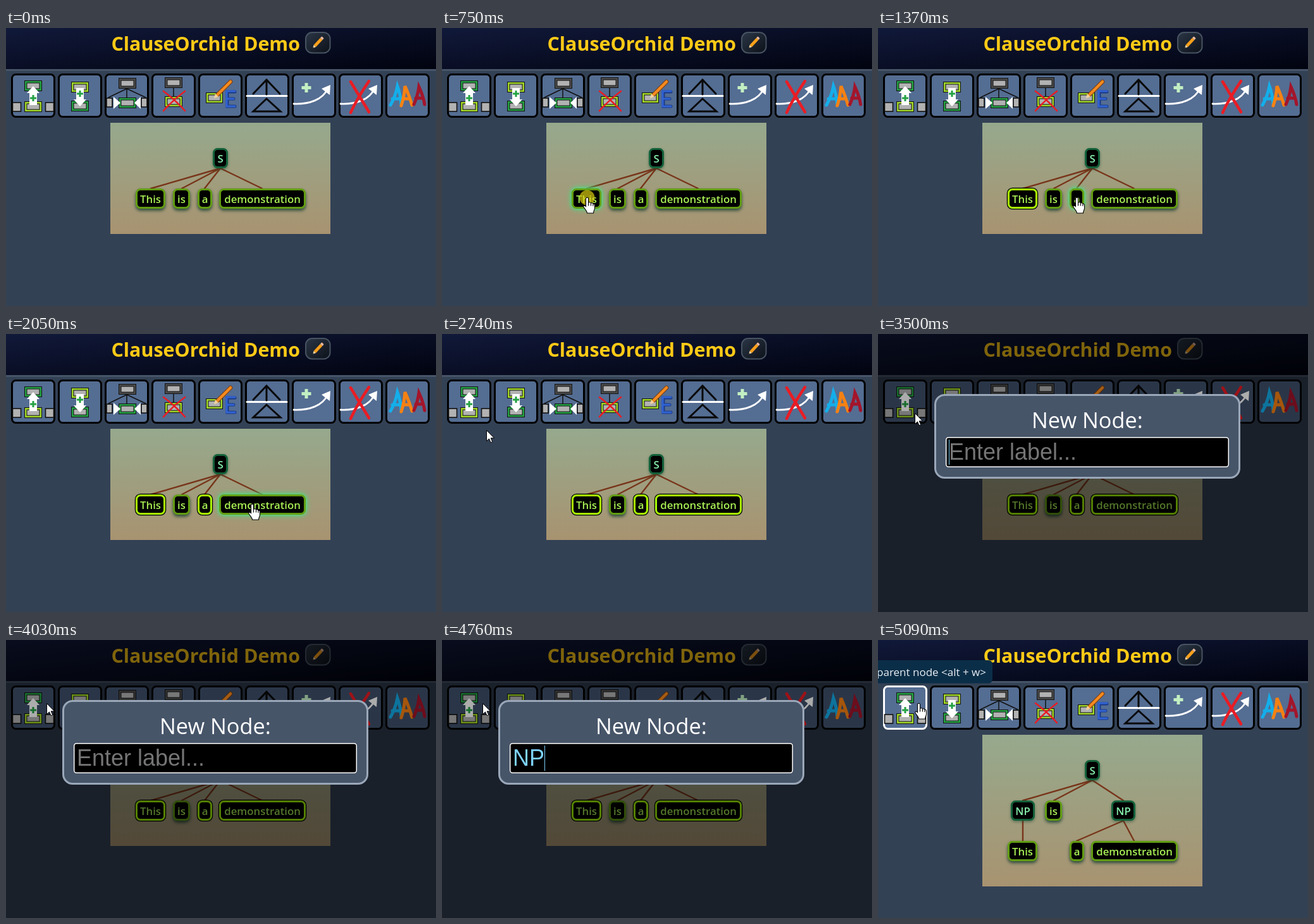
Animation, 680 px wide and 440 px high, one loop 7220 ms. Source, as an HTML page:

```html
<!DOCTYPE html>
<html lang="en">
<head>
<meta charset="utf-8">
<title>ClauseOrchid Demo</title>
<style>
  html, body { margin: 0; width: 100%; height: 100%; overflow: hidden; background: #334155; }
  svg { display: block; width: 680px; height: 440px; }
  text { font-family: "Open Sans", "Noto Sans", sans-serif; }
  .title { font-size: 30.4px; font-weight: 700; fill: #ffca16; }
  .btn { fill: #546d92; stroke: #000; stroke-width: 3; }
  .btn.hover { stroke: #fff; }
  .branch { stroke: #78351a; stroke-width: 2.4; stroke-linecap: round; }
  .node { filter: drop-shadow(0 2px 2px rgba(10, 60, 40, .45)); }
  .node text { font-size: 16.8px; font-weight: 600; text-anchor: middle; fill: #86efac; }
  .node .edge { fill: #000; stroke: #14613a; stroke-width: 3; }
  .node .rim { fill: none; stroke: #000; stroke-width: 5.4; visibility: hidden; }
  .leaf { filter: drop-shadow(0 3px 2.5px rgba(4, 50, 40, .75)); }
  .leaf text { fill: #a9f055; }
  .leaf .edge { stroke: #629d12; }
  .picked { filter: none; }
  .picked .edge { stroke: #aaff00; }
  .picked .rim { visibility: visible; }
  .glow { filter: drop-shadow(0 0 2px #4ade80) drop-shadow(0 0 4px #4ade80); }
  .tip { font-size: 17px; fill: #e8eef4; text-anchor: end; }
  .ask { font-size: 34.3px; fill: #fff; text-anchor: middle; }
  .entry { font: 36px "Liberation Sans", Arial, sans-serif; }
</style>
</head>
<body>
<svg id="stage" viewBox="0 0 680 440" xmlns="http://www.w3.org/2000/svg">
  <defs>
    <linearGradient id="night" x1="0" y1="0" x2="1" y2="1">
      <stop offset="0" stop-color="#11193a"/><stop offset="1" stop-color="#01030f"/>
    </linearGradient>
    <linearGradient id="field" x1="0" y1="0" x2="0" y2="1">
      <stop offset="0" stop-color="#96a98d"/><stop offset="1" stop-color="#a89370"/>
    </linearGradient>
    <linearGradient id="steel" x1="0" y1="0" x2="1" y2="1">
      <stop offset="0" stop-color="#2b3646"/><stop offset="1" stop-color="#0c1119"/>
    </linearGradient>
  </defs>
  <rect width="680" height="440" fill="#334155"/>
  <rect width="680" height="66" fill="url(#night)"/>
  <rect y="65" width="680" height="3" fill="#475569"/>
  <text class="title" x="465" y="36" text-anchor="end">ClauseOrchid Demo</text>
  <rect x="474" y="7" width="38.5" height="32.5" rx="10" fill="url(#steel)" stroke="#475361" stroke-width="2"/>
  <g transform="translate(485 32) rotate(-47)">
    <path d="M0 0L5 -2.4V2.4Z" fill="#f3d9a5"/>
    <path d="M0 0L2 -1V1Z" fill="#222"/>
    <rect x="5" y="-2.4" width="15" height="4.8" fill="#f9a01b"/>
    <rect x="20" y="-2.4" width="3.5" height="4.8" rx="1" fill="#e8b9a0"/>
  </g>
  <g id="buttons"></g>
  <g id="icons"></g>
  <rect id="panel" x="165" y="150" width="348" height="176" fill="url(#field)"/>
  <g id="flat"></g>
  <g id="grown"></g>
  <g id="tooltip">
    <rect x="-40" y="32" width="221" height="36.5" rx="6" fill="#0b2e48"/>
    <text class="tip" x="171" y="56.5">Add parent node &lt;alt + w&gt;</text>
  </g>
  <g id="dialog">
    <rect width="680" height="440" fill="#000" opacity=".5"/>
    <use href="#icons" opacity=".35"/>
    <rect x="90.5" y="96.5" width="481" height="131" rx="15" fill="#475569" stroke="#9aa7b9" stroke-width="3"/>
    <text class="ask" x="331" y="149">New Node:</text>
    <rect x="107.7" y="163.7" width="446.6" height="46.6" rx="4" fill="#000" stroke="#fff" stroke-width="1.5"/>
    <text class="entry" id="entry" x="112" y="199"></text>
    <rect id="caret" y="167" width="1" height="40" fill="#7dd3fc"/>
  </g>
  <circle id="press" r="12" fill="#d8cc10" opacity=".7"/>
  <path id="arrow" d="M0 0V17L4 13.3L6.6 19.2L9.2 18L6.7 12.3H12Z" fill="#fff" stroke="#000"/>
  <path id="hand" d="M-2 1.5C-2 -.8 2 -.8 2 1.5V8C3 6.8 5.5 7 6 8.7C7.3 7.7 9 8.3 9.4 10C11 9.2 12 10.3 12 12V17C12 19 10 21 10 24.5H0C0 21.5 -3 19 -5.5 14.8C-6.5 12.8 -4 11.6 -2 14Z M2 8V13M6 9V13M9.4 10V13.5" fill="#fff" stroke="#000" stroke-width="1.1"/>
</svg>
<script>
const LOOP = 7220, STEP = 70;
const $ = id => document.getElementById(id);

function add(parent, tag, attrs, text) {
  const el = document.createElementNS('http://www.w3.org/2000/svg', tag);
  for (const k in attrs) el.setAttribute(k, attrs[k]);
  if (text) el.textContent = text;
  parent.appendChild(el);
  return el;
}

// Toolbar
const buttons = Array.from({ length: 9 }, (_, i) =>
  add($('buttons'), 'rect', { class: 'btn', x: 9.5 + 74 * i, y: 73.5, width: 67, height: 67, rx: 6 }));

const icons = $('icons');
const fill = (d, color) => add(icons, 'path', { d, fill: color });
const line = (d, color, width) =>
  add(icons, 'path', { d, fill: 'none', stroke: color, 'stroke-width': width, 'stroke-linecap': 'round' });
const plus = (x, y, r, color, width) =>
  add(icons, 'path', { d: `M${x - r} ${y}h${2 * r}M${x} ${y - r}v${2 * r}`, stroke: color, 'stroke-width': width });

function box(x, y, color, w = 28, h = 17) {
  const rect = (m, c, edge) => add(icons, 'rect', {
    x: x + m, y: y + m, width: w - 2 * m, height: h - 2 * m, fill: c, stroke: edge
  });
  rect(.5, color, '#111');
  rect(4, '#b2b2b2', '#111');
}
const sideBox = (x, y, w) =>
  add(icons, 'rect', { x, y, width: w, height: 14, fill: '#b2b2b2', stroke: '#111', 'stroke-width': 1.6 });
const GREEN = '#25a244', LIME = '#a2d729', GREY = '#4b4b4b', RED = '#ea1c24';

box(29, 83, GREEN);
box(29, 116, LIME);
sideBox(10.5, 118, 13);
sideBox(62.5, 118, 13);
fill('M43 92L53 103H49V122H37V103H33Z', '#fff');
plus(43, 111, 5, GREEN, 3);

box(103, 85, LIME);
box(103, 115, GREEN);
fill('M117 124L127 113H123V95H111V113H107Z', '#fff');
plus(117, 104, 5, GREEN, 3);

line('M191 96L162 110M191 96V110M191 96L221 110', '#111', 1.5);
box(178, 79, GREY);
box(178, 110, GREEN);
sideBox(159, 111, 9);
sideBox(214, 111, 9);
fill('M170 109V128L181 118.5ZM213 109V128L203 118.5Z', '#fff');

line('M265 95V108', '#111', 1.5);
box(251, 78, GREY);
box(251, 108, LIME);
line('M249 100Q268 114 283 131M283 100Q264 114 249 131', RED, 2.6);

box(316, 102, LIME, 27);
line('M334 106L355 85', '#7a3d10', 6.5);
line('M334 106L355 85', '#f58a1f', 4.5);
fill('M329 111L331 104L336 109Z', '#f2d3a0');
line('M362 101H350V124H362M350 112H360', '#1b3a86', 5);
line('M362 100H349V124H362M349 112H360', '#3163d4', 3.2);

line('M381 107.5H444', '#fff', 3);
line('M391 104L412 82L433 104M412 82V105M412 112L391 132H434Z', '#0a0a0a', 3);

function swoop(x) {
  line(`M${x} 120C${x + 25} 121 ${x + 46} 113 ${x + 53} 97`, '#fff', 2.8);
  fill(`M${x + 58} 90L${x + 57} 106L${x + 44} 96Z`, '#fff');
}
swoop(455);
plus(475, 94.5, 7.5, '#c2efc2', 5);
swoop(529);
line('M545 85Q560 110 574 133M574 84Q555 112 545 134', RED, 4.5);

line('M608 122Q616 108 619 92Q624 106 625 121M611 112H623', '#14aeea', 5);
line('M625 123Q630 108 631 92Q638 108 642 122M628 112H638', '#f58113', 5);
line('M645 121Q651 108 653 93Q660 108 662 121M648 111H659', '#a3152b', 5);

// Trees
function branches(parent, x, y, ends) {
  for (const end of ends) add(parent, 'line', { class: 'branch', x1: x, y1: y, x2: end, y2: y + 32 });
}
function node(parent, label, x1, x2, y, kind = '') {
  const g = add(parent, 'g', { class: 'node ' + kind });
  const shape = { x: x1 + 1.5, y: y + 1.5, width: x2 - x1 - 3, height: 29, rx: 6 };
  add(g, 'rect', { ...shape, class: 'rim' });
  add(g, 'rect', { ...shape, class: 'edge' });
  add(g, 'text', { x: (x1 + x2) / 2, y: y + 22.5 }, label);
  return { g, x1, x2, y };
}
const WORDS = [['This', 205, 252], ['is', 264, 291], ['a', 303, 326], ['demonstration', 337, 474]];
const PICKED_AT = [880, Infinity, 1630, 2320];

branches($('flat'), 339, 222, [229, 278, 314, 405]);
node($('flat'), 'S', 327, 351, 190);
const leaves = WORDS.map(w => node($('flat'), ...w, 254, 'leaf'));

branches($('grown'), 339, 222, [229, 278, 388]);
branches($('grown'), 229, 286, [229]);
branches($('grown'), 388, 286, [314, 405]);
node($('grown'), 'S', 327, 351, 190);
node($('grown'), 'NP', 210, 248, 254);
node($('grown'), 'NP', 369, 407, 254);
WORDS.forEach((w, i) => node($('grown'), ...w, i === 1 ? 254 : 318, 'leaf'));

// Pointer moves: start, end, from, to, easing
const smooth = p => p * p * (3 - 2 * p);
const slow = p => 1 - (1 - p) ** 2;
const MOVES = [
  [130, 550, [456, 405], [229, 268], smooth],
  [810, 1370, [229, 268], [314, 268], smooth],
  [1560, 2120, [314, 268], [392, 269], smooth],
  [2250, 2740, [392, 269], [70, 152], smooth],
  [2740, 2950, [70, 152], [58, 125], slow],
  [3770, 3770, [58, 125], [64, 100], slow]
];
const PRESSES = [[750, 880], [1500, 1630], [2250, 2320], [3370, 3500]];
const TYPING = [[3500, '', 112], [4030, '', 0], [4430, 'N', 138], [4760, 'NP', 162]];

function pointer(t) {
  const [t0, t1, from, to, ease] = MOVES.filter(m => m[0] <= t).pop() || MOVES[0];
  const at = Math.floor((t - t0) / STEP) * STEP;
  const p = t >= t1 ? 1 : ease(Math.max(0, at / (t1 - t0)));
  return from.map((v, i) => Math.round(v + (to[i] - v) * p));
}

const show = (el, on) => { el.style.display = on ? '' : 'none'; };

function render(t) {
  const [x, y] = pointer(t);
  const asking = t >= 3500 && t < 5090, done = t >= 5090;
  const inside = (x1, x2, y1, y2) => !asking && t >= 130 && x >= x1 && x <= x2 && y >= y1 && y <= y2;

  show($('flat'), !done);
  show($('grown'), done);
  $('panel').setAttribute('height', done ? 240 : 176);

  let over = false;
  leaves.forEach((leaf, i) => {
    const hot = !done && inside(leaf.x1, leaf.x2, leaf.y, leaf.y + 32);
    over = over || hot;
    leaf.g.classList.toggle('picked', t >= PICKED_AT[i]);
    leaf.g.classList.toggle('glow', hot);
  });
  const onButton = inside(8, 78, 72, 142);
  buttons[0].classList.toggle('hover', onButton);
  show($('tooltip'), onButton);

  show($('dialog'), asking);
  if (asking) {
    const [, value, caret] = TYPING.filter(k => k[0] <= t).pop();
    $('entry').textContent = value || 'Enter label...';
    $('entry').setAttribute('fill', value ? '#7dd3fc' : '#757575');
    $('caret').setAttribute('x', caret);
    show($('caret'), caret > 0);
  }

  const hand = over || onButton;
  show($('hand'), t >= 130 && hand);
  show($('arrow'), t >= 130 && !hand);
  show($('press'), PRESSES.some(([a, b]) => t >= a && t < b));
  for (const id of ['hand', 'arrow', 'press'])
    $(id).setAttribute('transform', `translate(${x + .5} ${y + .5})`);
}

const start = performance.now();
function tick() {
  render((performance.now() - start) % LOOP);
  requestAnimationFrame(tick);
}
tick();
</script>
</body>
</html>
```
